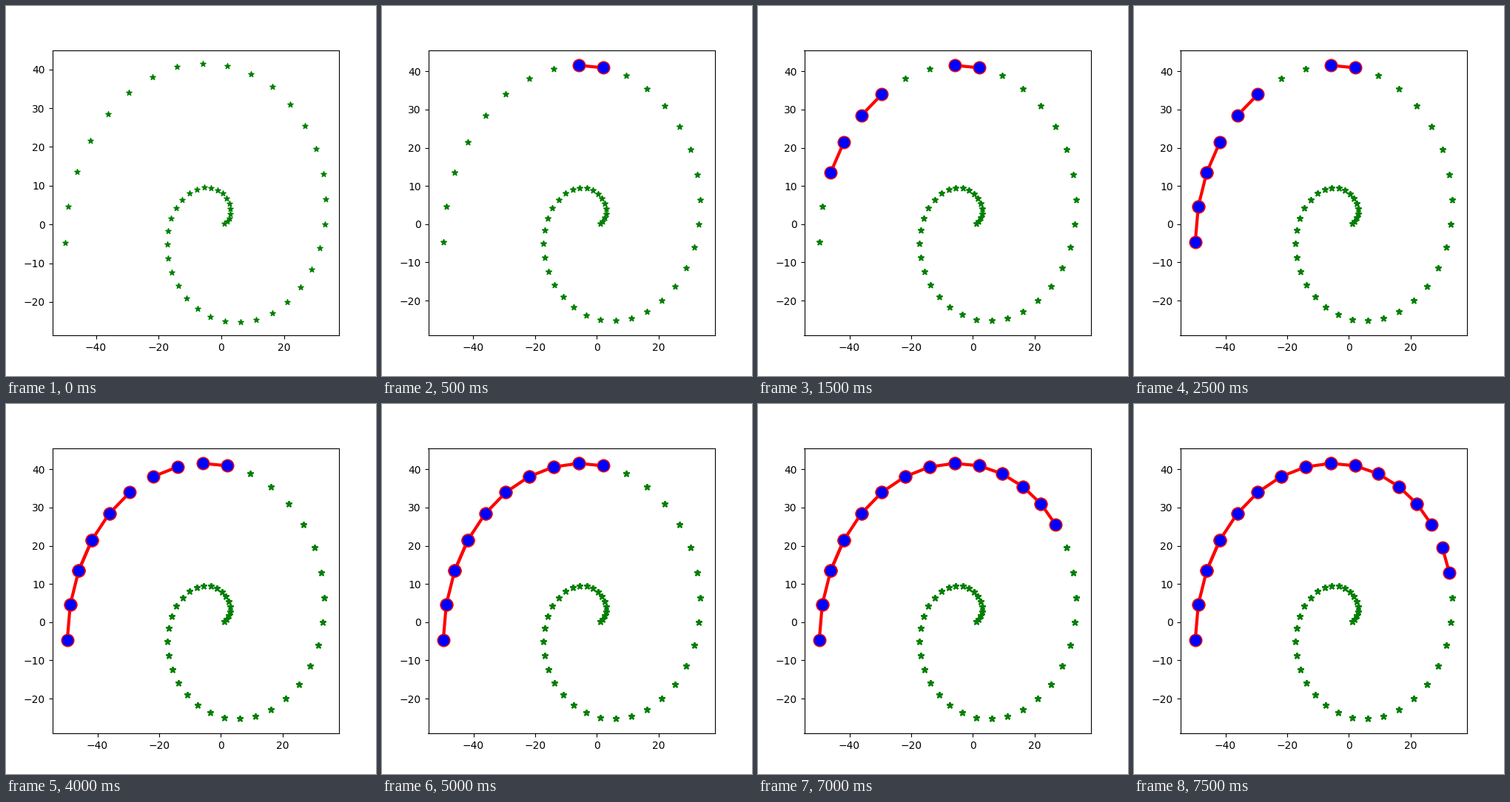
Recreate the animation shown at these times as a matplotlib script. Size 500 by 500 pixels, loop 8000 ms.

```python
import numpy as np
import matplotlib.pyplot as plt
from matplotlib.animation import FuncAnimation

STEPS = 16
STAR_SIZE = 30
MARGIN = 0.05

# Spiral: radius grows by one per point, one full turn every 33 points
r = np.arange(1, 51)
angle = r * 2 * np.pi / 33
x, y = r * np.cos(angle), r * np.sin(angle)

# Lower point number of the edge (n, n + 1) added at each step
EDGES = [None, 41, 45, 47, 48, 49, 47, 46, 43, 44, 42, 37, 39, 40, 38, 35]

fig, ax = plt.subplots(figsize=(5, 5), dpi=100)


def view_limits(data, pads, pixels):
    """View range after each redraw, as the markers' extents widen the data range."""
    low, high = np.inf, -np.inf
    per_pixel = 1 / pixels
    views = []
    for _ in range(STEPS):
        low = min(low, data.min() - pads[0] * per_pixel)
        high = max(high, data.max() + pads[1] * per_pixel)
        extra = MARGIN * (high - low)
        views.append((low - extra, high + extra))
        per_pixel = (high - low + 2 * extra) / pixels
    return views


radius = np.sqrt(STAR_SIZE) / 2
side = radius * np.sin(np.radians(72))
foot = radius * np.cos(np.radians(36))
xlims = view_limits(x, (side, side), 387.5)
ylims = view_limits(y, (foot, radius), 385)

# Stars are painted again at every step, edges pile up on top
layers = []
for n in EDGES:
    layer = [ax.scatter(x, y, s=STAR_SIZE, marker="*", color="green")]
    if n:
        layer += ax.plot(x[n - 1:n + 1], y[n - 1:n + 1], color="red", lw=3,
                         marker="o", markersize=12, markerfacecolor="blue")
    layers.append(layer)


def update(step):
    for k, layer in enumerate(layers):
        for artist in layer:
            artist.set_visible(k <= step)
    ax.set_xlim(xlims[step])
    ax.set_ylim(ylims[step])
    return []


anim = FuncAnimation(fig, update, frames=STEPS, interval=500,
                     repeat=True, repeat_delay=0, blit=False)
plt.show()
```
